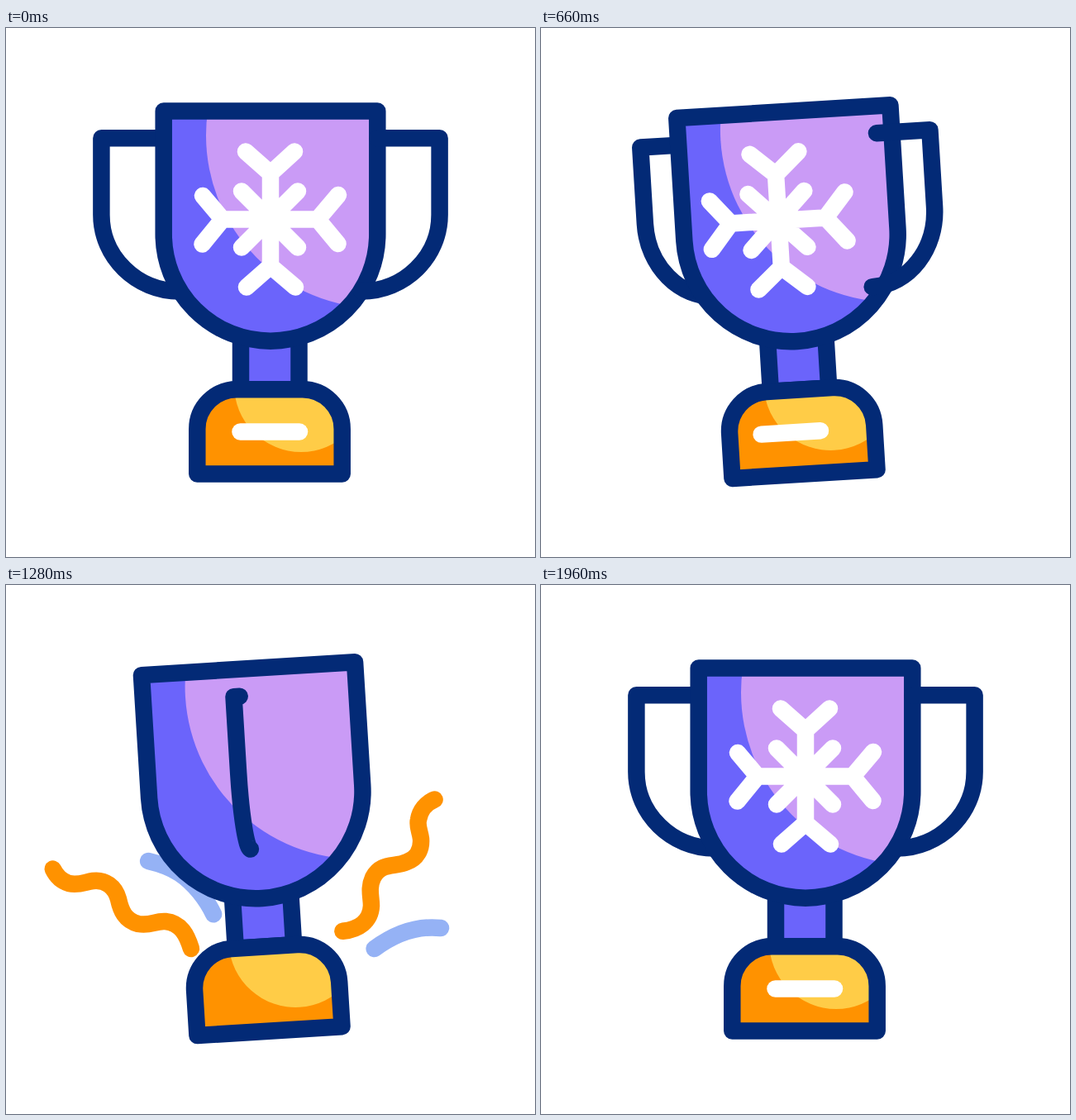
Write an HTML page that moves like this. It is 640 by 640 pixels and loops after 2.4 s.

```html
<!DOCTYPE html>
<html lang="en">
<head>
<meta charset="utf-8">
<title>Winter trophy</title>
<style>
  html, body { margin: 0; width: 100%; height: 100%; overflow: hidden; background: #fff; }
  svg { display: block; width: 100%; height: 100%; }
  path, line { fill: none; stroke-linecap: round; stroke-linejoin: round; stroke-width: 20.5; }
  .ink { stroke: #032a76; }
  .white { stroke: #fff; }
  .orange { stroke: #ff9200; }
  .blue { stroke: #95b2f5; }
</style>
</head>
<body>
<svg viewBox="0 0 640 640">
  <defs>
    <path id="cup" d="M190.7 100.4H449.3V249.4A129.3 129.3 0 0 1 190.7 249.4Z"/>
    <path id="base" d="M231.3 539.6V485.3A48 48 0 0 1 279.3 437.3H358.7A48 48 0 0 1 406.7 485.3V539.6Z"/>
    <clipPath id="inCup"><use href="#cup"/></clipPath>
    <clipPath id="inBase"><use href="#base"/></clipPath>
  </defs>

  <g id="confetti">
    <path class="orange" d="M236 462C231 456 227 449 224 440C219 424 212 409 193 407C180 406 175 413 160 410C144 406 139 394 136 380C132 365 120 356 105 358C96 359 88 364 76 361C66 358 60 351 56 342C53 334 52 319 39 310"/>
    <path class="orange" d="M389 434C391 427 396 420 404 419C425 418 441 408 442 388C442 377 438 367 444 354C454 335 470 342 485 335C497 331 503 320 502 307C501 298 497 292 499 284C501 272 509 263 520 259C532 256 546 257 554 245"/>
    <path class="blue" d="M254 410Q253 404 251 398C243 381 228 361 210 349C198 341 185 337 172 334L154 330"/>
    <path class="blue" d="M438 446C460 428 490 411 526 415L541 417"/>
  </g>

  <g id="trophy">
    <path id="back" class="ink"/>
    <path class="ink" style="fill:#6b64fb" d="M284 378V437.3H354.5V378"/>
    <g clip-path="url(#inCup)">
      <rect x="180" y="90" width="280" height="300" fill="#6b64fb"/>
      <circle cx="451" cy="130" r="209" fill="#ca9bf6"/>
      <path class="white slide" d="M320 176V288M262 231.5H377M290 149.5L320 176L349 149.5M291 313.5L320 288L350 313.5M238 203L262 231.5L237.5 261.5M402 202L377 231.5L401.5 261M285 197.5L353 265.5M353 197.5L285 265.5"/>
    </g>
    <use href="#cup" class="ink"/>
    <g clip-path="url(#inBase)">
      <rect x="220" y="427" width="200" height="125" fill="#ff9200"/>
      <circle cx="357" cy="432" r="81" fill="#ffcc47"/>
      <line class="white slide" x1="283.5" y1="488.5" x2="355" y2="488.5"/>
    </g>
    <use href="#base" class="ink"/>
    <path id="front" class="ink"/>
  </g>
</svg>
<script>
  const LOOP = 2400, STEP = 20;
  const $ = id => document.getElementById(id);
  const ribbons = [...$('confetti').children];
  const slides = [...document.querySelectorAll('.slide')];
  ribbons.forEach(r => r.setAttribute('pathLength', 1));

  // Each track lists [ms, value]; segments ease in and out.
  const tilt = [[0, 0], [440, -17.8], [852, 8.2], [1245, -3.7], [1570, 1.8], [1960, 0]];
  const windUp = [[0, 1], [460, .69], [840, 1]];
  const spin = [[840, -1], [1780, 1]];
  const leave = [[0, 0], [433, -49], [1486, 245]];
  const enter = [[1129, -245], [1930, 0]];
  const head = [[922, 0], [1388, 1]];
  const tail = [[1196, 0], [1653, 1]];

  function at(track, t) {
    if (t <= track[0][0]) return track[0][1];
    for (let i = 1; i < track.length; i++) {
      const [t0, a] = track[i - 1], [t1, b] = track[i];
      if (t < t1) {
        const u = (t - t0) / (t1 - t0);
        return a + (b - a) * u * u * (3 - 2 * u);
      }
    }
    return track[track.length - 1][1];
  }

  // A handle seen side-on, squeezed sideways by s; negative s lies on the left.
  function handle(s) {
    const x = d => (320 + d * s).toFixed(2);
    return `M${x(129.3)} 133.2H${x(204.6)}V226C${x(204.6)} 277 ${x(162)} 318.5 ${x(110)} 318.5`;
  }

  function draw(t) {
    $('trophy').setAttribute('transform', `rotate(${at(tilt, t)} 319.5 539.7)`);

    const s = t < 840 ? at(windUp, t) : at(spin, t);
    $('front').setAttribute('d', handle(s));
    $('back').setAttribute('d', handle(-s));

    const shift = t < 1300 ? at(leave, t) : at(enter, t);
    slides.forEach(e => e.setAttribute('transform', `translate(${shift} 0)`));

    const h = at(head, t), k = at(tail, t);
    ribbons.forEach(r => {
      r.style.display = h > k ? '' : 'none';
      r.style.strokeDasharray = `${h - k} 2`;
      r.style.strokeDashoffset = -k;
    });
  }

  const start = performance.now();
  function tick() {
    const t = (performance.now() - start) % LOOP;
    draw(Math.floor(t / STEP) * STEP);
    requestAnimationFrame(tick);
  }
  tick();
</script>
</body>
</html>
```
